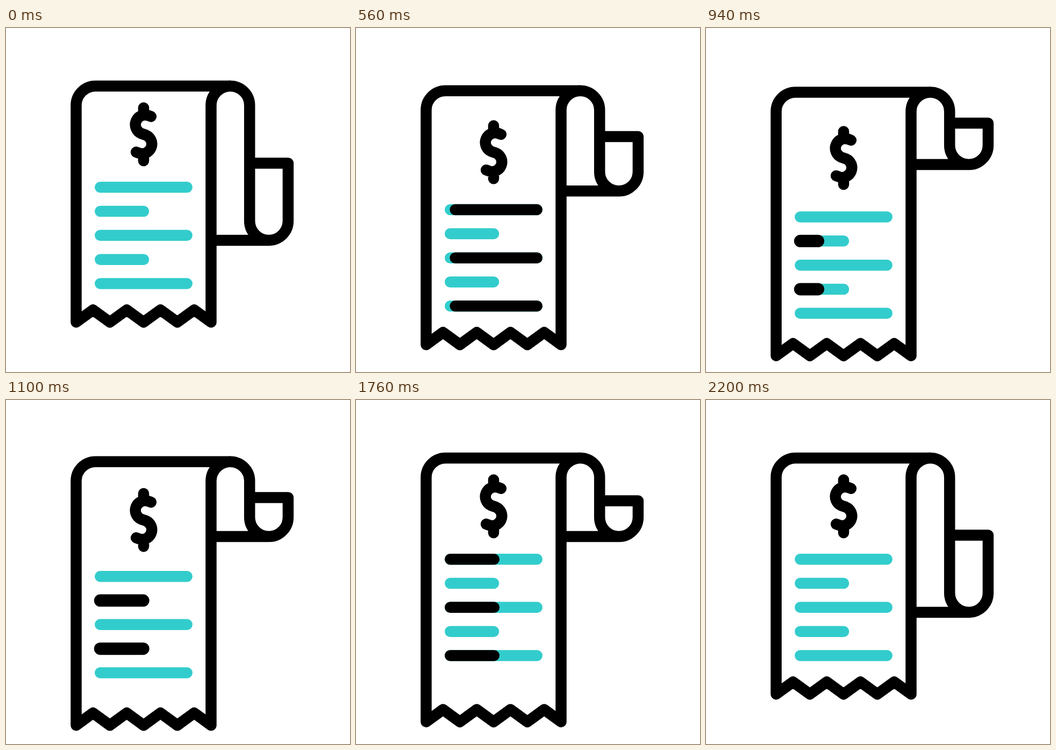
An HTML page for the animation above (2.4 s loop, 640x640 px).

```html
<!DOCTYPE html>
<html lang="en">
<head>
<meta charset="utf-8">
<title>Receipt</title>
<style>
  html, body { margin: 0; width: 100%; height: 100%; overflow: hidden; background: #fff; }
  svg { display: block; width: 100%; height: 100%; }
  path { fill: none; stroke: #000; stroke-width: 20.5; stroke-linecap: round; stroke-linejoin: round; }
  .row { stroke: #3cc; }
</style>
</head>
<body>
<svg viewBox="0 0 640 640">
  <g id="rows"></g>
  <path id="dollar" d="M269.8 164.7L265 162.9A18 18 0 0 0 251.6 196.3L260.4 199.3A18 18 0 0 1 247 232.7L242.2 230.9M256 148.5V162M256 234V247"/>
  <path id="paper"/>
</svg>
<script>
const LOOP = 2400;
const ROW_X = 175.3;
const $ = id => document.getElementById(id);

// Eased progress from 0 to 1 between two times
const ease = (t, from, to) => {
  const u = Math.min(1, Math.max(0, (t - from) / (to - from)));
  return u * u * (3 - 2 * u);
};

function addPath(className, width) {
  const path = document.createElementNS('http://www.w3.org/2000/svg', 'path');
  path.setAttribute('class', className);
  path.style.strokeWidth = width;
  $('rows').append(path);
  return path;
}

const rows = [0, 1, 2, 3, 4].map(i => {
  const short = i % 2 === 1;
  const y = 296.2 + 44.82 * i;
  const length = short ? 80.7 : 161.4;
  addPath('row', 20.5).setAttribute('d', `M${ROW_X} ${y}h${length}`);
  return { y, length, starts: short ? [800] : [200, 1600], ink: addPath('ink', short ? 23 : 20.5) };
});

// Black ink runs in from the left, then runs out to the right
function drawInk({ y, length, starts, ink }, t) {
  const start = starts.findLast(s => t > s) ?? starts[0];
  const head = ease(t, start, start + 320) * length;
  const tail = ease(t, start + 320, start + (start === 1600 ? 600 : 600)) * length;
  ink.setAttribute('d', head > tail ? `M${ROW_X + tail} ${y}H${ROW_X + head}` : '');
}

function paperPath(top, bottom, roll, flap) {
  const r = 35.85;
  let d = `M381.5 ${bottom}`;
  for (let i = 1; i <= 8; i++) d += `L${381.5 - i * 31.375} ${bottom - (i % 2) * 22.8}`;
  return d + `V${top + r}a${r} ${r} 0 0 1 ${r} ${-r}H417.3
    M381.5 ${bottom}V${top + r}a${r} ${r} 0 0 1 ${2 * r} 0
    V${roll - r}a${r} ${r} 0 0 0 ${2 * r} 0V${flap}H453.2
    M381.5 ${roll}H489a${r} ${r} 0 0 0 ${r} ${-r}`;
}

function draw(t) {
  const pull = ease(t, 200, 800);
  const settle = ease(t, 800, 1400);
  const rewind = ease(t, 1800, 2200);
  const bump = pull - settle;

  $('paper').setAttribute('d', paperPath(
    108.1 + 13.2 * bump,
    547.3 + 64.3 * pull - 12.9 * settle - 51.4 * rewind,
    394.9 - 140.8 * (pull - rewind),
    251.4 - 76 * pull + 12 * settle + 64 * rewind
  ));
  $('dollar').setAttribute('transform', `translate(0 ${51.2 * bump})`);
  $('rows').setAttribute('transform', `translate(0 ${64.3 * bump})`);
  rows.forEach(row => drawInk(row, t));
}

function tick() {
  draw(performance.now() % LOOP);
  requestAnimationFrame(tick);
}
tick();
</script>
</body>
</html>
```
